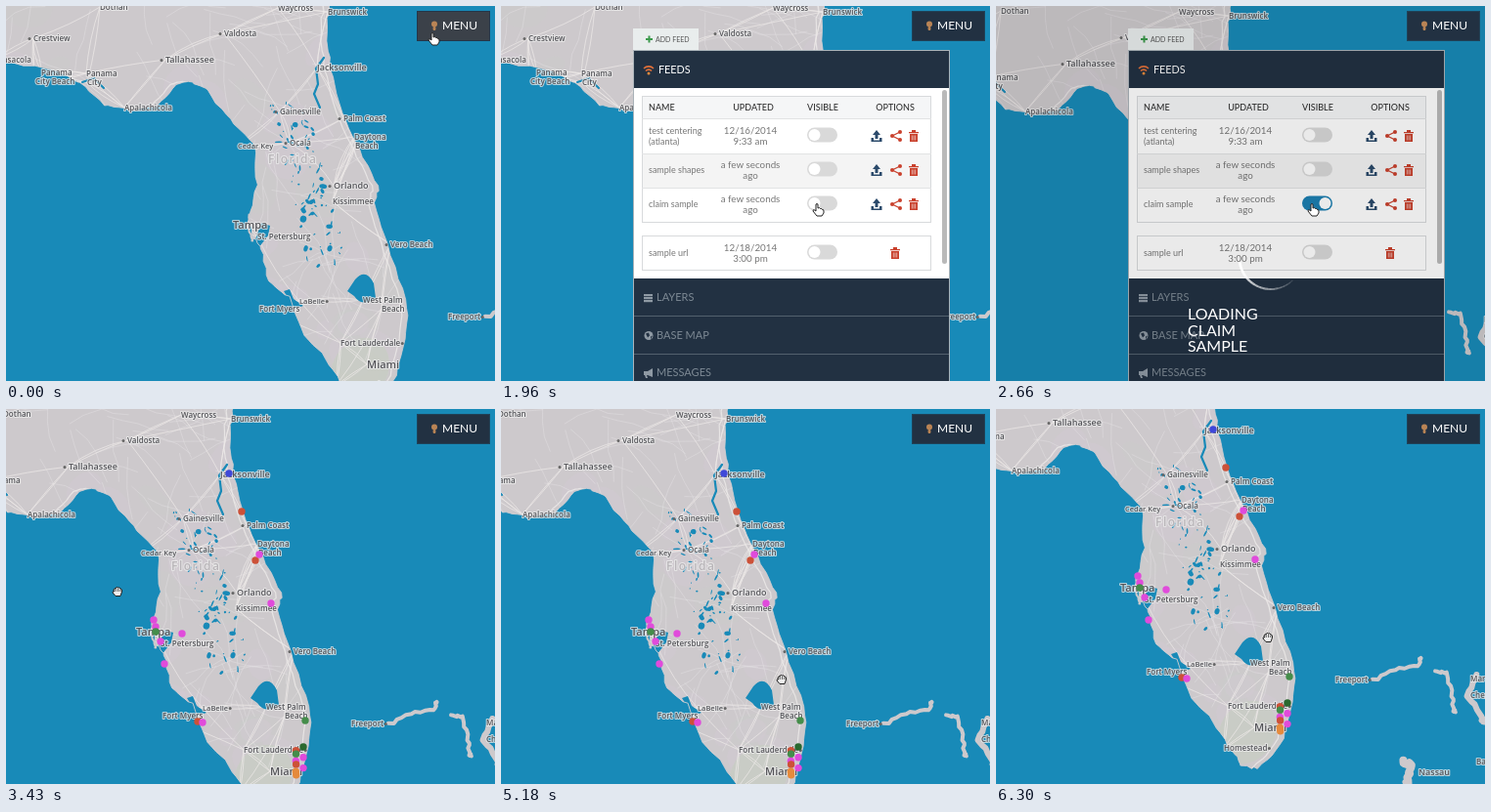
These frames come from a looping animation (500 px wide and 384 px high, 6.37 s). An HTML page with a canvas:

```html
<!DOCTYPE html>
<html lang="en">
<head>
<meta charset="utf-8">
<title>Map feeds menu</title>
<style>
html, body { margin: 0; width: 100%; height: 100%; overflow: hidden; background: #188ab8 }
canvas { display: block }
</style>
</head>
<body>
<canvas id="stage" width="500" height="384"></canvas>
<script>
const LOOP = 6370, NAVY = '#223142', WATER = '#188ab8', LAND = '#cdc9cc', RED = '#c9402c', ORANGE = '#e58a3c';
const stage = document.getElementById('stage').getContext('2d');
let g = stage;

const ramp = (t, a, b) => Math.max(0, Math.min(1, (t - a) / (b - a)));
const smooth = (u) => u * u * (3 - 2 * u);

let seed = 7;
const rand = () => (seed = (seed * 16807) % 2147483647) / 2147483647;
const spread = (n) => (rand() - 0.5) * 2 * n;

// Interpolates [time, x, y] keys with eased segments.
function follow(t, keys) {
  let a = keys[0];
  for (const b of keys) {
    if (t < b[0]) {
      const u = smooth(ramp(t, a[0], b[0]));
      return [a[1] + (b[1] - a[1]) * u, a[2] + (b[2] - a[2]) * u];
    }
    a = b;
  }
  return [a[1], a[2]];
}

function rect(x, y, w, h, fill, r = 0) {
  g.fillStyle = fill;
  g.beginPath();
  g.roundRect(x, y, w, h, r);
  g.fill();
}

function frame(x, y, w, h, color) {
  g.strokeStyle = color;
  g.lineWidth = 1;
  g.strokeRect(x + 0.5, y + 0.5, w - 1, h - 1);
}

function blob(x, y, rx, ry, fill, turn = 0) {
  g.fillStyle = fill;
  g.beginPath();
  g.ellipse(x, y, rx, ry, turn, 0, 7);
  g.fill();
}

const disc = (x, y, r, fill) => blob(x, y, r, r, fill);

function line(path, color, width) {
  g.strokeStyle = color;
  g.lineWidth = width;
  g.stroke(new Path2D(path));
}

function shape(x, y, d, fill, outline) {
  g.save();
  g.translate(x, y);
  g.fillStyle = fill;
  g.fill(new Path2D(d));
  if (outline) line(d, outline, 1);
  g.restore();
}

function text(s, x, y, size, color, align = 'left', weight = 400) {
  g.font = `${weight} ${size}px Lato, sans-serif`;
  g.textAlign = align;
  g.textBaseline = 'middle';
  g.fillStyle = color;
  g.fillText(s, x, y);
}

// ---------- Map ----------

// Key points of the shore, roughened when drawn.
const COAST = [[-5,-15], [-5,57], [52,66], [76,79], [100,101], [126,107], [154,103], [174,80], [190,77],
  [206,87], [229,116], [254,143], [257,182], [249,218], [253,238], [261,248], [268,282], [289,298],
  [305,338], [327,361], [347,392], [356,407], [373,409], [396,386], [409,342], [410,302], [389,243],
  [376,201], [381,185], [361,148], [343,110], [331,62], [328,20], [333,-15]];

// Name, label position, size, and the side of the town dot.
const PLACES = [
  ['Dothan',96,1], ['Crestview',28,33,8,'left'], ['Pensacola',-13,55], ['Panama',36,68], ['City Beach',30,77],
  ['Panama',82,69], ['City',83,78], ['Tallahassee',163,55,9,'left'], ['Apalachicola',121,104],
  ['Valdosta',223,28,8,'left'], ['Waycross',278,2], ['Brunswick',329,6], ['Jacksonville',318,63,9],
  ['Gainesville',280,108,8,'left'], ['Palm Coast',345,115,8,'left'], ['Daytona',356,134], ['Beach',357,143],
  ['Ocala',290,140,8,'left'], ['Cedar Key',237,143,7.5], ['Orlando',335,184,9,'left'], ['Kissimmee',334,200,8],
  ['Tampa',232,224,11], ['St. Petersburg',257,236], ['Vero Beach',393,244,8,'left'],
  ['LaBelle',300,302,7.5,'right'], ['West Palm',365,301], ['Beach',384,310], ['Fort Myers',259,310],
  ['Fort Lauderdale',342,345,8,'right'], ['Miami',369,367,11], ['Homestead',338,388,8,'right'],
  ['Freeport',452,318,8,'right'], ['Marsh',590,317], ['Chester',590,334], ['Nassau',537,413,9], ['Bay',596,402]];

function mapText(s, x, y, size, color) {
  g.font = `600 ${size}px "Open Sans", "Noto Sans", sans-serif`;
  g.textBaseline = 'middle';
  g.strokeStyle = 'rgba(236,236,236,.75)';
  g.lineWidth = 2.2;
  g.strokeText(s, x, y);
  g.fillStyle = color;
  g.fillText(s, x, y);
}

function roughen(points, amount) {
  const path = new Path2D();
  points.forEach(([x, y], i) => {
    const [nx, ny] = points[i + 1] || points[i];
    for (let u = 0; u < 1; u += 0.2)
      path.lineTo(x + (nx - x) * u + spread(amount), y + (ny - y) * u + spread(amount));
  });
  return path;
}

function drawRoads() {
  for (let i = 0; i < 150; i++) {
    let x = rand() * 400, y = rand() * 350 - 10, a = Math.floor(rand() * 4) * 1.57 + spread(0.5);
    let d = `M${x} ${y}`;
    for (let k = 0; k < 4; k++) {
      a += spread(0.35);
      d += `L${x += Math.cos(a) * 16} ${y += Math.sin(a) * 16}`;
    }
    line(d, 'rgba(232,229,231,.55)', 0.7);
  }
  // Highways join each town to its nearest neighbours.
  for (const [, x, y] of PLACES.filter((p) => p[1] < 420)) {
    const near = PLACES.map(([, px, py]) => [px, py, Math.hypot(px - x, py - y)])
      .filter((p) => p[2] > 22).sort((a, b) => a[2] - b[2]).slice(0, 3);
    for (const [px, py] of near)
      line(`M${x} ${y}Q${(x + px) / 2 + spread(7)} ${(y + py) / 2 + spread(7)} ${px} ${py}`, 'rgba(236,232,231,.75)', 1);
  }
}

function drawWaters() {
  for (let i = 0; i < 95; i++) {
    const u = rand();
    blob(288 + 42 * u + spread(19), 100 + 165 * u + spread(9), 0.5 + rand() ** 3 * 3.5, 0.6 + rand() ** 2 * 3, WATER, spread(1));
  }
  line('M325 53L317 64 319 80 315 90 321 104', WATER, 2.2);
  line('M78 78L90 74 100 84', WATER, 2);
  shape(0, 0, 'M357 280Q368 268 376 284L378 299Q364 309 356 297L349 292z', WATER);
  shape(0, 0, 'M254 242L261 222 270 225 268 235 258 248z', WATER);
  shape(0, 0, 'M284 292l6-2 4 10 10 7-9 3z', WATER);
}

function drawMap() {
  const canvas = document.createElement('canvas');
  canvas.width = 620;
  canvas.height = 440;
  g = canvas.getContext('2d');
  g.translate(0, 10);
  g.lineJoin = g.lineCap = 'round';
  rect(0, -10, 620, 440, WATER);

  const land = roughen(COAST, 1.3);
  land.closePath();
  g.fillStyle = LAND;
  g.fill(land);
  g.save();
  g.clip(land);
  for (let i = 0; i < 45; i++)
    blob(rand() * 410, rand() * 400, 8 + rand() * 22, 6 + rand() * 18,
      i % 2 ? 'rgba(200,206,198,.2)' : 'rgba(210,200,209,.4)', rand() * 3);
  blob(362, 372, 28, 34, 'rgba(198,207,194,.6)', 0.6);
  drawRoads();
  // A highway follows the shore a little inland.
  g.translate(-6, 0);
  line(land, 'rgba(238,235,234,.8)', 1.2);
  g.translate(6, 0);
  drawWaters();
  g.restore();
  line(land, '#d3d0d2', 0.8);

  line(roughen([[249, 214], [247, 226], [252, 240]], 0.7), LAND, 2);
  line(roughen([[490, 319], [513, 308], [537, 304], [539, 296]], 1.2), LAND, 4);
  line(roughen([[555, 309], [566, 312], [571, 334], [574, 350]], 1.5), LAND, 4);
  line(roughen([[596, 312], [588, 334], [603, 360]], 1.5), LAND, 6);
  line(roughen([[520, 402], [530, 405], [526, 423]], 1.5), LAND, 8);

  g.letterSpacing = '1.5px';
  mapText('Florida', 268, 158, 12, '#b9b5b9');
  g.letterSpacing = '0px';
  for (const [name, x, y, size = 8, side] of PLACES) {
    mapText(name, x, y + 0.8, size, '#55555a');
    if (side) disc(side === 'left' ? x - 4 : x + g.measureText(name).width + 2, y + 0.5, 1.5, '#666');
  }
  g = stage;
  return canvas;
}

const MAGENTA = '#e04bdb', BRICK = '#cc5138', GREEN = '#458d4b', BLUE = '#3f48d8';
const MARKERS = [[BLUE,327,62], [BRICK,340,101], [BRICK,354,151], [MAGENTA,358,145], [MAGENTA,370,195],
  [MAGENTA,279,226], [MAGENTA,250,212], [MAGENTA,252,219], [GREEN,252,224], [MAGENTA,257,234],
  [MAGENTA,261,257], [BRICK,295,316], [MAGENTA,300,317], [GREEN,405,315]];
const CITY_COLORS = ['#2a692f', BRICK, GREEN, MAGENTA, MAGENTA, BRICK, MAGENTA, ORANGE, ORANGE];
CITY_COLORS.forEach((c, i) => MARKERS.push([c, 398 + 5 * Math.cos(i * 2.1), 342 + i * 3.6]));

// ---------- Menu ----------

function toggle(x, y, on) {
  rect(x - 16, y - 7.5, 31, 15, on > 0.5 ? '#1c7fb2' : '#d9d9d9', 7.5);
  disc(x - 8.5 + 16 * on, y, 6, '#fff');
}

const upload = (x, y) => shape(x, y, 'M0-6L4-1H1.5V3H-1.5V-1H-4zM-5.5 2H-3V4.5H3V2H5.5V6H-5.5z', '#2b4a6b');

function share(x, y) {
  line(`M${x + 4} ${y - 4}L${x - 4} ${y}L${x + 4} ${y + 4}`, RED, 1.3);
  [[4, -4], [-4, 0], [4, 4]].forEach(([dx, dy]) => disc(x + dx, y + dy, 2, RED));
}

function trash(x, y) {
  shape(x, y, 'M-5-4H-2V-6H2V-4H5V-2.8H-5zM-4-2H4V6H-4z', RED);
  for (let dx = -1.7; dx < 2; dx += 1.7) line(`M${x + dx} ${y - 0.5}v5`, '#f0d5d0', 0.7);
}

function row(y, name, updated, on, full = true) {
  const put = (lines, x, size, align) => lines.forEach((s, i) =>
    text(s, x, y + 0.5 + (i - (lines.length - 1) / 2) * 11.5, size, '#777', align));
  put(name, 151, 9);
  put(updated, 255, 9.8, 'center');
  toggle(329, y - 1, on);
  if (full) {
    upload(384, y);
    share(404, y);
  }
  trash(full ? 422 : 403, y);
}

function drawFeeds(on) {
  rect(136, 84, 322, 195, '#fff');
  rect(144, 92, 296, 23, '#f5f6f7');
  rect(144, 151, 296, 35, '#f4f4f4');
  frame(144, 92, 296, 130, '#d8dadc');
  frame(144, 235, 296, 36, '#d8dadc');
  [115, 151, 186].forEach((y) => rect(144, y, 296, 1, '#e2e3e4'));
  text('NAME', 151, 104, 9, '#333', 'left', 500);
  [['UPDATED', 258], ['VISIBLE', 329], ['OPTIONS', 403]].forEach(([s, x]) => text(s, x, 104, 9, '#333', 'center', 500));
  row(133, ['test centering', '(atlanta)'], ['12/16/2014', '9:33 am'], 0);
  row(168, ['sample shapes'], ['a few seconds', 'ago'], 0);
  row(203, ['claim sample'], ['a few seconds', 'ago'], on);
  row(253, ['sample url'], ['12/18/2014', '3:00 pm'], 0, false);
  rect(451, 86, 5, 178, '#b9b9b9', 2.5);
}

function drawPanel(open, on) {
  rect(135, 23, 67, 23, '#e9eded');
  line('M148 34h7M151.5 30.5v7', '#3c9a4c', 2);
  text('ADD FEED', 158, 34.5, 7, '#555');
  const bottom = 84 + 195 * open;
  g.save();
  g.beginPath();
  g.rect(135, 84, 324, 195 * open);
  g.clip();
  drawFeeds(on);
  g.restore();

  rect(135, 45, 324, 39, NAVY);
  disc(151, 69, 1.5, ORANGE);
  line('M148 66.5a4 4 0 0 1 6 0M146 64a7 7 0 0 1 10 0', '#e0703a', 1.6);
  text('FEEDS', 161, 66, 10.8, '#fff');

  rect(135, bottom, 324, 400, NAVY);
  ['LAYERS', 'BASE MAP', 'MESSAGES'].forEach((s, i) => {
    const y = bottom + 20 + i * 38.5;
    text(s, 159, y, 11, '#7d8994');
    rect(135, Math.round(y + 18), 324, 1, '#53616e');
  });
  const icon = '#8f9aa4';
  [-4, -1, 2].forEach((dy) => rect(146, bottom + 20 + dy, 9, 2.2, icon));
  disc(151, bottom + 58.5, 4.5, icon);
  shape(151, bottom + 58.5, 'M-3-2L0-3 1 0-1 2zM2 1L4 0 2 4z', NAVY);
  shape(151, bottom + 97, 'M-5-2H-1L4-5V4L-1 2H-2L-1 5H-3L-4 2H-5z', icon);
  frame(135, 45, 324, 400, '#aab3b9');
}

function drawMenuButton(hover) {
  rect(420, 5, 75, 31, hover ? '#3b4149' : NAVY);
  frame(420, 5, 75, 31, hover ? '#24374a' : '#1f4258');
  disc(438, 18.5, 3, '#b98455');
  rect(436.6, 21, 2.8, 4, '#b98455', 1);
  text('MENU', 446, 20, 12, '#fff');
}

function drawLoading(t) {
  const head = (t - 2310) / 560 * Math.PI * 2 + Math.PI * 1.7;
  for (let i = 0; i < 20; i++) {
    g.strokeStyle = `rgba(255,255,255,${1 - i / 22})`;
    g.lineWidth = 2.8 - i * 0.08;
    g.beginPath();
    g.arc(281, 258, 32, head - (i + 1) * 0.11, head - i * 0.11 + 0.01);
    g.stroke();
  }
  ['LOADING', 'CLAIM', 'SAMPLE'].forEach((s, i) => text(s, 196, 316 + i * 16.7, 16, '#fff'));
}

function drawCursor(x, y, grabbing) {
  if (!grabbing) {
    shape(x, y, 'M-1 0Q0-1 1 0V4Q3 3 3.5 4.5 5 4 5.5 5.5 7 5 7 7V9L5 12H0L-4 7Q-4 5-2.5 6L-1 7z', '#fff', '#222');
    return;
  }
  shape(x, y, 'M-4-2Q-3-4-2-3-1-6 .5-4 2-5 3-3 5-3 4.5 0L3 4.5H-2L-5 1Q-5-1-3.5 0z', '#eee', '#222');
  line(`M${x - 1.8} ${y - 3}v3M${x + 0.6} ${y - 3.5}v3.5M${x + 2.8} ${y - 2.5}v2.5`, '#333', 0.8);
}

const CURSOR = [[250, 436, 28], [800, 374, 58], [1250, 374, 58], [1950, 323, 203], [2760, 323, 203],
  [3250, 114, 187], [3650, 114, 187], [4950, 287, 277], [5450, 287, 277], [6240, 278, 234]];

const map = drawMap();

function draw(t) {
  const pan = 1 - (1 - ramp(t, 2400, 2858)) ** 3;
  const drag = smooth(ramp(t, 5450, 6240));
  const dx = Math.round(-99 * pan - 6 * drag), dy = Math.round(4 * pan - 45 * drag);
  g.drawImage(map, dx, dy - 10);
  if (t >= 2600) MARKERS.forEach(([color, x, y]) => disc(x + dx, y + dy, 3.7, color));

  g.globalAlpha = ramp(t, 180, 380) * (1 - ramp(t, 3060, 3260));
  if (g.globalAlpha > 0) drawPanel(smooth(ramp(t, 820, 1090)), ramp(t, 2050, 2170));
  g.globalAlpha = 1;

  const dim = 0.42 * ramp(t, 2160, 2290) * (1 - ramp(t, 2500, 2700));
  rect(0, 0, 500, 384, `rgba(0,0,0,${dim})`);
  drawMenuButton(t < 350);
  if (t >= 2200 && t < 2730) drawLoading(t);
  drawCursor(...follow(t, CURSOR), t >= 3060);
}

const start = performance.now();
function tick() {
  draw((performance.now() - start) % LOOP);
  requestAnimationFrame(tick);
}
tick();
</script>
</body>
</html>
```
